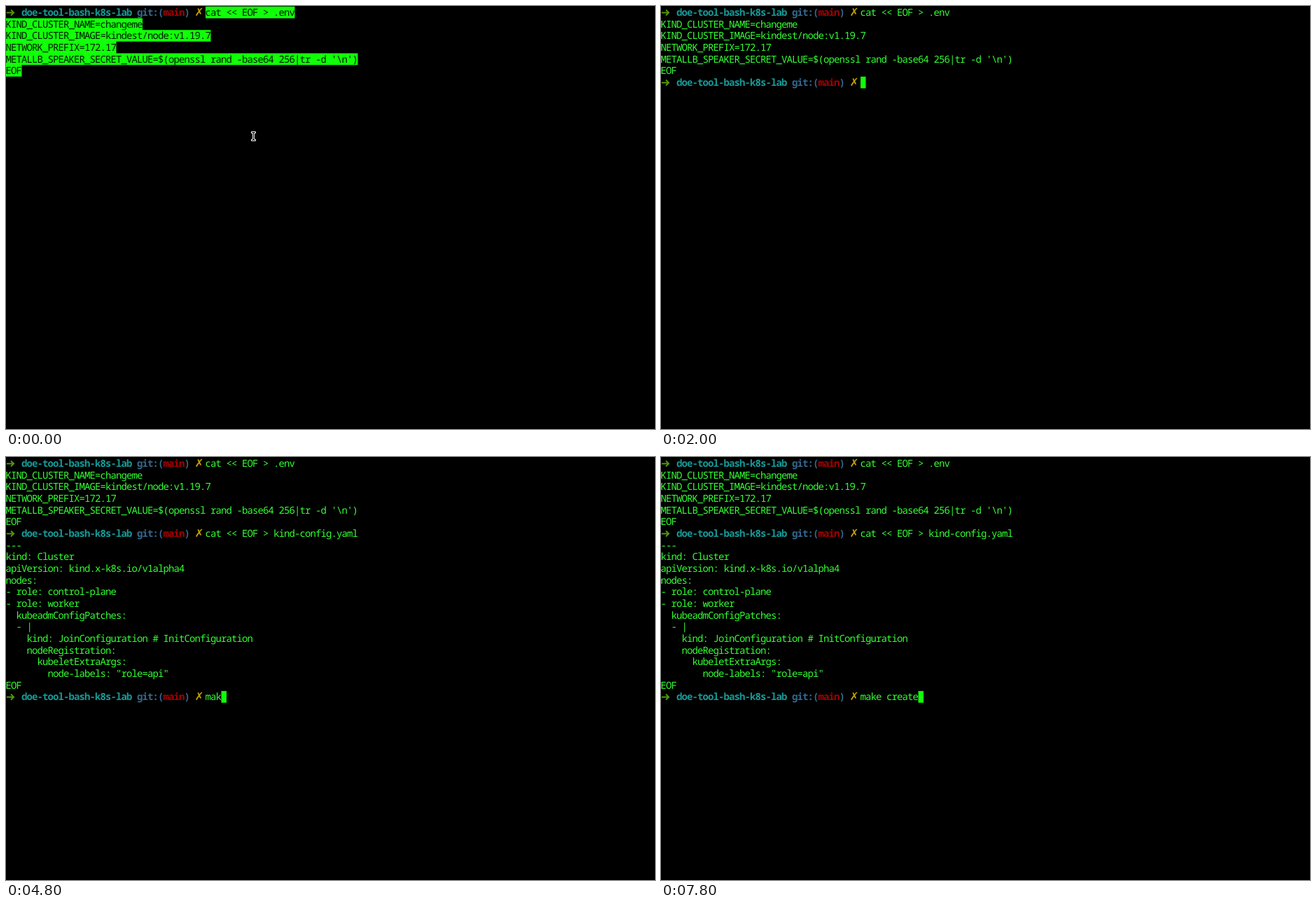
An HTML page that plays this animation: 927 by 604 pixels, repeating every 8 s.

```html
<!DOCTYPE html>
<html lang="en">
<head>
<meta charset="utf-8">
<title>Terminal session</title>
<style>
  html, body { margin: 0; width: 100%; height: 100%; overflow: hidden; background: #000; }
  svg { display: block; width: 927px; height: 604px; }
  text {
    font: 500 14px "Noto Sans Mono", "DejaVu Sans Mono", monospace;
    letter-spacing: -0.9px;
    font-variant-ligatures: none;
    text-rendering: geometricPrecision;
    white-space: pre;
  }
  .bold { font-weight: 700; }
  .cross { font: 15.5px "DejaVu Sans", sans-serif; letter-spacing: 0; }
</style>
</head>
<body>
<svg id="screen" viewBox="0 0 927 604"></svg>
<script>
const LOOP = 8000;
const CELL = 7.5, ROW = 50 / 3, TOP = 5 / 6, BASE = 13;
const PROMPT_COLS = 38;
const GREEN = "#33ff33", BRIGHT = "#11ff08";

const envBlock = [
  "cat << EOF > .env",
  "KIND_CLUSTER_NAME=changeme",
  "KIND_CLUSTER_IMAGE=kindest/node:v1.19.7",
  "NETWORK_PREFIX=172.17",
  "METALLB_SPEAKER_SECRET_VALUE=$(openssl rand -base64 256|tr -d '\\n')",
  "EOF"
];
const configBlock = [
  "cat << EOF > kind-config.yaml",
  "---",
  "kind: Cluster",
  "apiVersion: kind.x-k8s.io/v1alpha4",
  "nodes:",
  "- role: control-plane",
  "- role: worker",
  "  kubeadmConfigPatches:",
  "  - |",
  "    kind: JoinConfiguration # InitConfiguration",
  "    nodeRegistration:",
  "      kubeletExtraArgs:",
  "        node-labels: \"role=api\"",
  "EOF"
];
const CONFIG_ROW = envBlock.length;
const MAKE_ROW = CONFIG_ROW + configBlock.length;
const COMMAND = "make create";

// Each entry: time of the key press, characters shown from then on.
const typing = [[4000, 0], [4600, 1], [4800, 3], [5000, 4], [5200, 6],
                [5400, 7], [5800, 8], [6200, 9], [6800, 11]];

const screen = document.getElementById("screen");
const escapeText = s => s.replace(/&/g, "&amp;").replace(/</g, "&lt;").replace(/>/g, "&gt;");
const rowTop = row => TOP + row * ROW;
const firstCol = line => line ? 0 : PROMPT_COLS;

function text(col, row, str, color, cls = "") {
  const x = col * CELL - 0.45, y = rowTop(row) + BASE;
  return `<text class="${cls}" x="${x}" y="${y}" fill="${color}" xml:space="preserve">${escapeText(str)}</text>`;
}

const cells = (col, row, count) =>
  `M${col * CELL} ${rowTop(row)}h${count * CELL}v${ROW}h${-count * CELL}z`;
const fill = d => `<path d="${d}" fill="${BRIGHT}"/>`;
const cursor = (col, row) => fill(cells(col, row, 1));

function prompt(row) {
  const y = rowTop(row) + 8.6;
  return `<path d="M1 ${y}H11M7 ${y - 4}L11 ${y}L7 ${y + 4}" fill="none" stroke="#4e9a06" stroke-width="2"/>` +
    text(3, row, "doe-tool-bash-k8s-lab", "#169a98", "bold") +
    text(25, row, "git:(", "#34688f", "bold") +
    text(30, row, "main", "#a80000", "bold") +
    text(34, row, ")", "#34688f", "bold") +
    text(36, row, "✗", "#c4a000", "cross");
}

function block(lines, row, selected) {
  // One path for the whole selection keeps its rows free of seams.
  const back = selected ? fill(lines.map((s, i) => cells(firstCol(i), row + i, s.length)).join("")) : "";
  const color = selected ? "#001800" : GREEN;
  return prompt(row) + back + lines.map((s, i) => text(firstCol(i), row + i, s, color)).join("");
}

function pointer() {
  return `<path d="M350.5 179.5H356.5V181.5H354.5V190.5H356.5V192.5H350.5V190.5H352.5V181.5H350.5Z"
    fill="#000" stroke="#fff" stroke-width="1"/>`;
}

function picture(t) {
  let out = block(envBlock, 0, t < 2000);
  if (t < 2000) {
    const blink = (t >= 400 && t < 1000) || t >= 1800;
    if (blink) out += cursor(3, 5);
    if (t < 1800) out += pointer();
    return out;
  }
  if (t < 3000) return out + prompt(CONFIG_ROW) + cursor(PROMPT_COLS, CONFIG_ROW);

  out += block(configBlock, CONFIG_ROW, t < 3600);
  if (t < 3600) return out;
  if (t < 4000) return out + cursor(0, MAKE_ROW);

  const typed = typing.filter(([at]) => t >= at).pop()[1];
  out += prompt(MAKE_ROW) + text(PROMPT_COLS, MAKE_ROW, COMMAND.slice(0, typed), GREEN);
  if (t < 7600 || t >= 7800) out += cursor(PROMPT_COLS + typed, MAKE_ROW);
  return out;
}

let shown = "";
const start = performance.now();

function frame() {
  const next = picture((performance.now() - start) % LOOP);
  if (next !== shown) screen.innerHTML = shown = next;
  requestAnimationFrame(frame);
}
frame();
</script>
</body>
</html>
```
